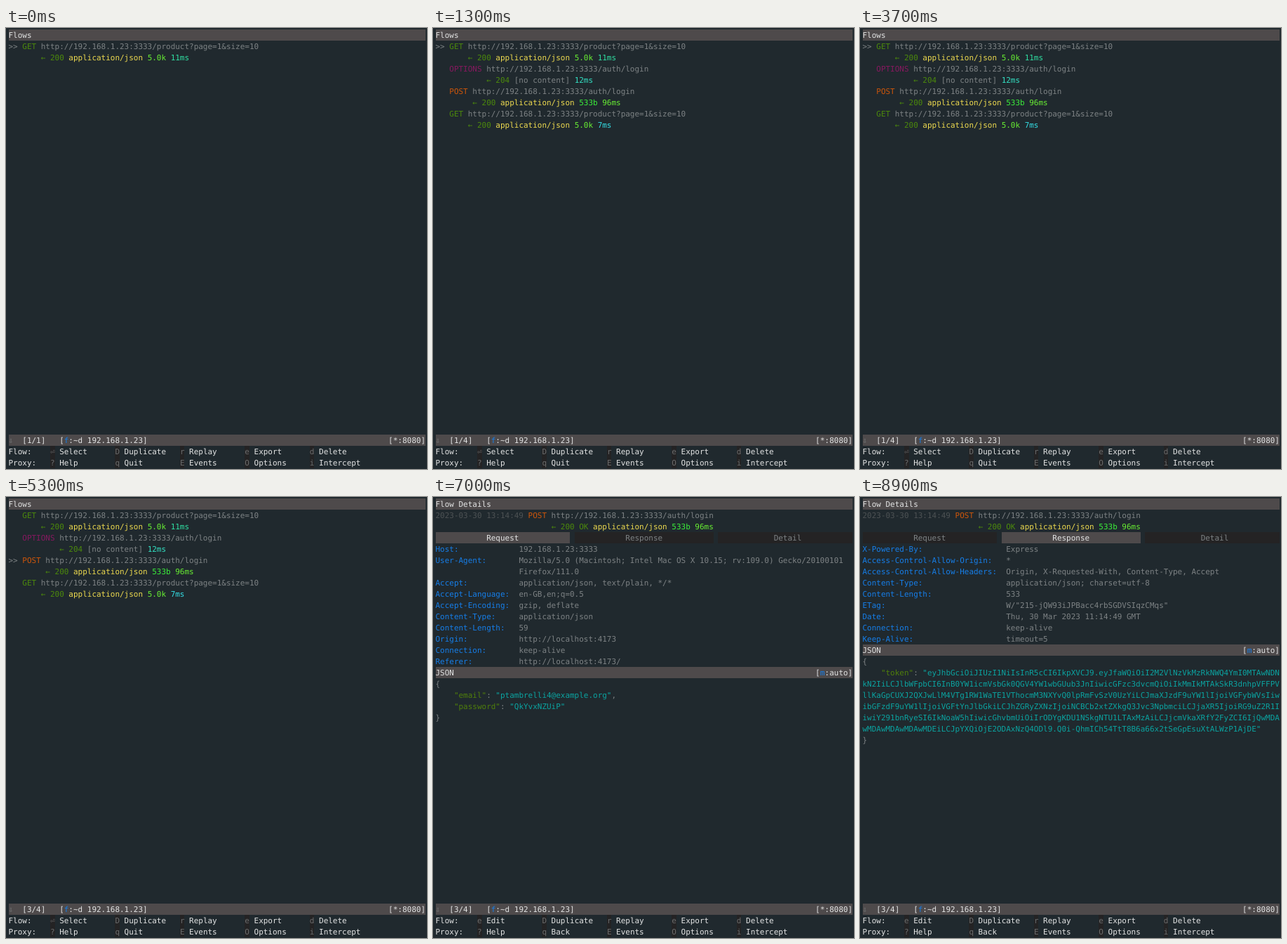
An HTML page for the animation above (9000 ms loop, 600 px wide and 628 px high).

```html
<!DOCTYPE html>
<html lang="en">
<head>
<meta charset="utf-8">
<title>Proxy flows</title>
<style>
  html, body { margin: 0; width: 100%; height: 100%; overflow: hidden; background: #20292e; }
  #stage {
    --w: 6.605px; --h: 16.03px;
    position: absolute; left: 3.5px; top: 2px; width: 594.5px; height: 626px;
    font: 10.97px/16.03px "DejaVu Sans Mono", monospace;
    text-rendering: geometricPrecision; font-variant-ligatures: none;
    color: #7d8284;
  }
  .layer { position: absolute; inset: 0; }
  .line, .fill {
    position: absolute; height: var(--h); white-space: pre;
    left: calc(var(--c) * var(--w)); top: calc(var(--r) * var(--h));
  }
  .line { margin-top: 0.8px; }
  .fill { width: calc(var(--n) * var(--w)); }
  .bar { background: #4e4a4b; }
  .tab { background: #242324; }
  .white { color: #e2e3e3; }
  .faint { color: #4d5254; }
  .key { color: #6a6c6d; }
  .green { color: #4c8a0c; }
  .olive { color: #4f7f0b; }
  .magenta { color: #86195f; }
  .orange { color: #cc560b; }
  .yellow { color: #ecd94f; }
  .lime { color: #68ee33; }
  .bright { color: #3bee3a; }
  .mint { color: #30dfa2; }
  .aqua { color: #33dfc2; }
  .cyan { color: #34dbe2; }
  .blue { color: #167ee8; }
  .teal { color: #0ba3a0; }
</style>
</head>
<body>
<div id="stage"></div>
<script>
const LOOP = 9000;
const ARRIVE = 600, DOWN1 = 4400, DOWN2 = 4900, OPEN = 5800, SWITCH = 7300;
const stage = document.getElementById('stage');
const sheet = document.head.appendChild(document.createElement('style'));
let layer;

function add(parent, cls, text = '') {
  const el = parent.appendChild(document.createElement('div'));
  el.className = cls;
  el.textContent = text;
  return el;
}

function place(el, row, col, cols = 0) {
  el.style.cssText = `--r:${row};--c:${col};--n:${cols}`;
}

// Opens a layer that is visible from one time to another.
function during(from, to) {
  layer = add(stage, 'layer');
  if (!from && to === LOOP) return;
  const name = `show${from}-${to}`;
  const pct = ms => ms / LOOP * 100 + '%';
  sheet.textContent += `@keyframes ${name} {
    0% { opacity: ${from ? 0 : 1} }
    ${pct(from)} { opacity: 1 }
    ${pct(to)} { opacity: ${to < LOOP ? 0 : 1} }
    100% { opacity: ${to < LOOP ? 0 : 1} }
  }\n`;
  layer.style.animation = `${name} ${LOOP}ms step-end infinite`;
}

function fill(row, col, cols, cls) {
  place(add(layer, 'fill ' + cls), row, col, cols);
}

// Parts are [text, class] pairs set one after another.
function put(row, col, ...parts) {
  const line = add(layer, 'line');
  place(line, row, col);
  for (const [text, cls] of parts) {
    const span = line.appendChild(document.createElement('span'));
    span.className = cls || '';
    span.textContent = text;
  }
}

function title(row, text) {
  fill(row, 0, 90, 'bar');
  put(row, 0, [text, 'white']);
}

const HOST = 'http://192.168.1.23:3333';
const LIST = HOST + '/product?page=1&size=10';
const LOGIN = HOST + '/auth/login';
const JSON_TYPE = ['application/json ', 'yellow'];

function flow(row, method, cls, url, ...reply) {
  put(row, 3, [method + ' ', cls], [url]);
  put(row + 1, 4 + method.length, ...reply);
}

function keys(row, ...pairs) {
  pairs.forEach(([key, label], i) => {
    const col = [9, 23, 37, 51, 65][i];
    if (!key) return;
    fill(row, col, 1, 'tab');
    put(row, col, [key, 'key'], [' ' + label, 'white']);
  });
}

function counter(text) {
  put(36, 3, [text, 'white']);
}

function tabs(active) {
  [['Request', 0, 29, 11], ['Response', 30, 30, 41], ['Detail', 61, 29, 73]].forEach(([name, col, cols, at], i) => {
    fill(3, col, cols, i === active ? 'bar' : 'tab');
    put(3, at, [name, i === active ? 'white' : '']);
  });
}

function headers(col, rows) {
  rows.forEach(([name, value], i) => {
    if (name) put(4 + i, 0, [name + ':', 'blue']);
    put(4 + i, col, [value]);
  });
}

function bodyBar(row) {
  title(row, 'JSON');
  put(row, 82, ['[', 'white'], ['m', 'blue'], [':auto]', 'white']);
}

during(0, LOOP);
fill(36, 0, 90, 'bar');
put(36, 0, ['⇩', '']);
put(36, 11, ['[', 'white'], ['f', 'blue'], [':~d 192.168.1.23]', 'white']);
put(36, 82, ['[*:8080]', 'white']);
put(37, 0, ['Flow:', 'white']);
put(38, 0, ['Proxy:', 'white']);
keys(37, [], ['D', 'Duplicate'], ['r', 'Replay'], ['e', 'Export'], ['d', 'Delete']);
keys(38, ['?', 'Help'], [], ['E', 'Events'], ['O', 'Options'], ['i', 'Intercept']);

during(0, OPEN);
title(0, 'Flows');
flow(1, 'GET', 'green', LIST, ['← 200 ', 'green'], JSON_TYPE, ['5.0k ', 'lime'], ['11ms', 'mint']);
keys(37, ['⏎', 'Select']);
keys(38, [], ['q', 'Quit']);

during(ARRIVE, OPEN);
flow(3, 'OPTIONS', 'magenta', LOGIN, ['← 204 ', 'green'], ['[no content] '], ['12ms', 'aqua']);
flow(5, 'POST', 'orange', LOGIN, ['← 200 ', 'green'], JSON_TYPE, ['533b ', 'bright'], ['96ms', 'lime']);
flow(7, 'GET', 'green', LIST, ['← 200 ', 'green'], JSON_TYPE, ['5.0k ', 'lime'], ['7ms', 'cyan']);

during(0, ARRIVE);
counter('[1/1]');
during(ARRIVE, DOWN1);
counter('[1/4]');
during(0, DOWN1);
put(1, 0, ['>>']);
during(DOWN1, DOWN2);
put(3, 0, ['>>']);
counter('[2/4]');
during(DOWN2, OPEN);
put(5, 0, ['>>']);
during(DOWN2, LOOP);
counter('[3/4]');

during(OPEN, LOOP);
title(0, 'Flow Details');
put(1, 0, ['2023-03-30 13:14:49 ', 'faint'], ['POST ', 'orange'], [LOGIN]);
put(2, 25, ['← 200 OK ', 'green'], JSON_TYPE, ['533b ', 'bright'], ['96ms', 'lime']);
keys(37, ['e', 'Edit']);
keys(38, [], ['q', 'Back']);

during(OPEN, SWITCH);
tabs(0);
headers(18, [
  ['Host', '192.168.1.23:3333'],
  ['User-Agent', 'Mozilla/5.0 (Macintosh; Intel Mac OS X 10.15; rv:109.0) Gecko/20100101'],
  ['', 'Firefox/111.0'],
  ['Accept', 'application/json, text/plain, */*'],
  ['Accept-Language', 'en-GB,en;q=0.5'],
  ['Accept-Encoding', 'gzip, deflate'],
  ['Content-Type', 'application/json'],
  ['Content-Length', '59'],
  ['Origin', 'http://localhost:4173'],
  ['Connection', 'keep-alive'],
  ['Referer', 'http://localhost:4173/'],
]);
bodyBar(15);
put(16, 0, ['{']);
put(17, 4, ['"email"', 'olive'], [': '], ['"ptambrelli4@example.org"', 'teal'], [',']);
put(18, 4, ['"password"', 'olive'], [': '], ['"QkYvxNZUiP"', 'teal']);
put(19, 0, ['}']);

during(SWITCH, LOOP);
tabs(1);
headers(31, [
  ['X-Powered-By', 'Express'],
  ['Access-Control-Allow-Origin', '*'],
  ['Access-Control-Allow-Headers', 'Origin, X-Requested-With, Content-Type, Accept'],
  ['Content-Type', 'application/json; charset=utf-8'],
  ['Content-Length', '533'],
  ['ETag', 'W/"215-jQW93iJPBacc4rbSGDVSIqzCMqs"'],
  ['Date', 'Thu, 30 Mar 2023 11:14:49 GMT'],
  ['Connection', 'keep-alive'],
  ['Keep-Alive', 'timeout=5'],
]);
bodyBar(13);
const token = '"eyJhbGciOiJIUzI1NiIsInR5cCI6IkpXVCJ9.' +
  'eyJfaWQiOiI2M2VlNzVkMzRkNWQ4YmI0MTAwNDNkN2IiLCJlbWFpbCI6' +
  'InB0YW1icmVsbGk0QGV4YW1wbGUub3JnIiwicGFzc3dvcmQiOiIk' +
  'MmIkMTAkSkR3dnhpVFFPVllKaGpCUXJ2QXJwLlM4VTg1RW1WaTE1VThocmM3NXYvQ0lpRmFvSzV0UzYi' +
  'LCJmaXJzdF9uYW1lIjoiVGFybWVsIiwibGFzdF9uYW1lIjoiVGFtYnJlbGki' +
  'LCJhZGRyZXNzIjoiNCBCb2xtZXkgQ3Jvc3NpbmciLCJjaXR5IjoiRG9uZ2R1' +
  'IiwiY291bnRyeSI6IkNoaW5hIiwicGhvbmUiOiIrODYgKDU1NSkgNTU1LTAxMzAi' +
  'LCJjcmVkaXRfY2FyZCI6IjQwMDAwMDAwMDAwMDAwMDEiLCJpYXQiOjE2ODAxNzQ4ODl9' +
  '.Q0i-QhmICh54TtT8B6a66x2tSeGpEsuXtALWzP1AjDE"';
put(14, 0, ['{']);
put(15, 4, ['"token"', 'olive'], [': '], [token.slice(0, 77), 'teal']);
for (let i = 0; i < 5; i++) put(16 + i, 0, [token.slice(77 + i * 90, 167 + i * 90), 'teal']);
put(21, 0, ['}']);
</script>
</body>
</html>
```
